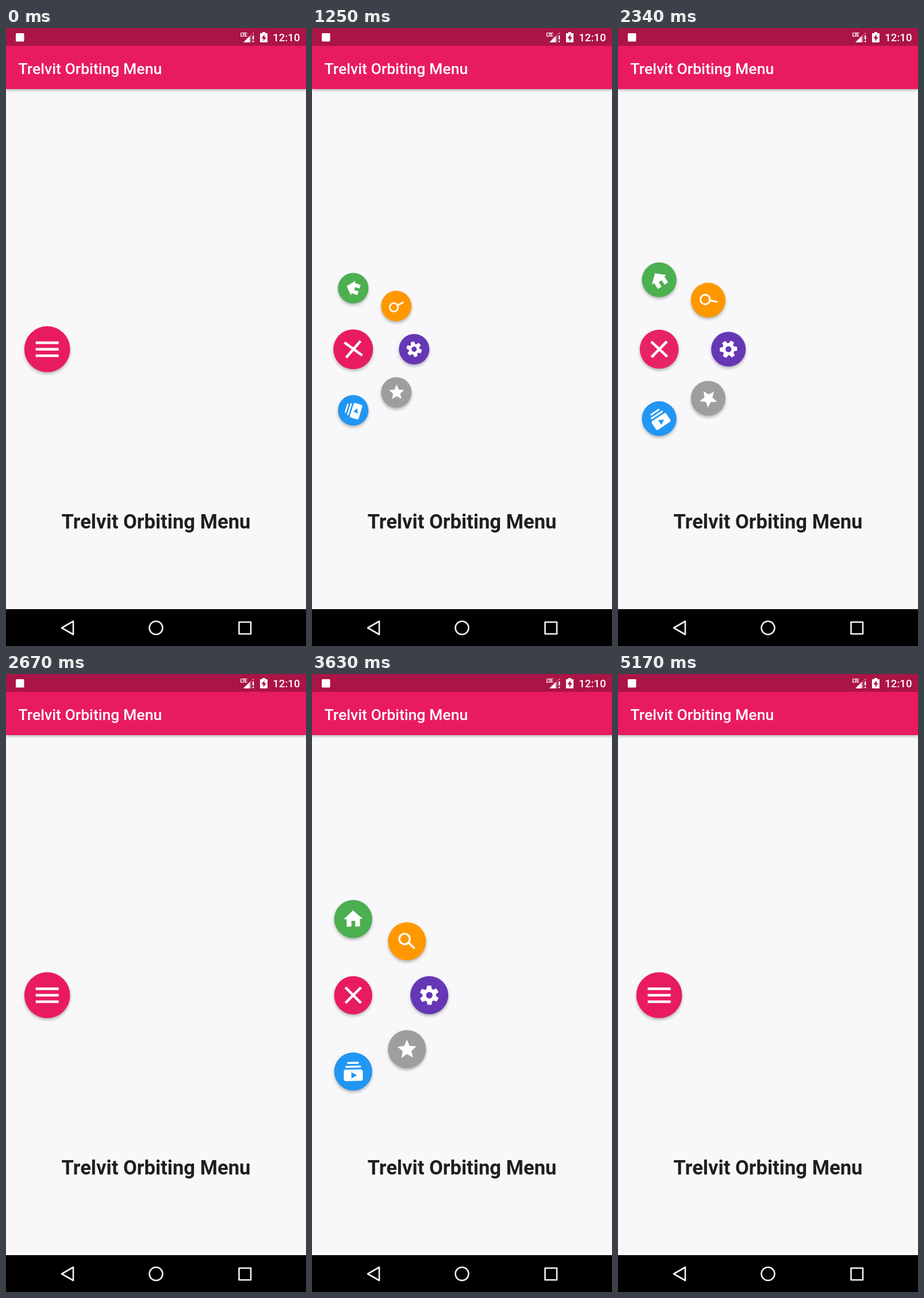
These frames come from a looping animation (522x1073 px, 5210 ms). An HTML page:

```html
<!DOCTYPE html>
<html lang="en">
<head>
<meta charset="utf-8">
<title>Circular menu</title>
<style>
  html, body { margin: 0; width: 100%; height: 100%; overflow: hidden; background: #f8f8fb; }
  svg { display: block; width: 100vw; height: 100vh; }
  text { font-family: Roboto, "Liberation Sans", sans-serif; font-weight: 500; fill: #fff; }
  .bar { filter: drop-shadow(0 2px 2px rgba(0, 0, 0, .3)); }
  .disc { filter: drop-shadow(0 3px 2.5px rgba(0, 0, 0, .28)); }
  .nav { fill: none; stroke: #f3f3ee; stroke-width: 2.6; stroke-linejoin: round; }
</style>
</head>
<body>
<svg viewBox="0 0 522 1073">
  <rect width="522" height="1073" fill="#f8f8fb"/>
  <rect class="bar" y="20" width="522" height="86" fill="#e91b60"/>
  <rect width="522" height="31" fill="#ab1446"/>

  <g fill="#fff">
    <rect x="17" y="9" width="14.5" height="14.5" rx="1.5"/>
    <text x="407.5" y="14.5" font-size="9.5" letter-spacing="-1.5" style="font-weight:700">LTE</text>
    <path d="M413 25 431.500 6.500V11H427V25z" opacity=".35"/>
    <path d="M413 25 424 14V25z"/>
    <path d="M429 13h2.400v7h-2.400zM429 22h2.400v2.500h-2.400z"/>
    <path d="M446 7h5v2h3q1 0 1 1v14q0 1-1 1h-11q-1 0-1-1v-14q0-1 1-1h3z"/>
    <path d="M449.700 11 444.500 18h3.300v5l5-7h-3.100z" fill="#ab1446"/>
    <text x="511.5" y="23" font-size="18.6" text-anchor="end">12:10</text>
  </g>

  <text x="21.5" y="79.5" font-size="26.6">Trelvit Orbiting Menu</text>
  <text x="261" y="868.5" font-size="34.6" text-anchor="middle" style="font-weight:700;fill:#1f1f20">Trelvit Orbiting Menu</text>

  <g id="items"></g>
  <g transform="translate(71.7 557.7)">
    <circle id="hub" class="disc" r="39.9" fill="#e91b60"/>
    <circle id="ink" r="39.9" fill="#c8c8c8"/>
    <g stroke="#fff" stroke-width="4.5">
      <path id="top"/>
      <path id="mid" d="M-20 0H20"/>
      <path id="low"/>
    </g>
  </g>

  <rect y="1009" width="522" height="64"/>
  <g class="nav">
    <path d="M97 1041.500 117 1030V1053z"/>
    <circle cx="261" cy="1041.500" r="11.500"/>
    <rect x="405.500" y="1031.500" width="20.500" height="20.500"/>
  </g>
</svg>
<script>
const LOOP = 5210, MOVE = 500, FRAME = 1000 / 24;
const DP = 522 / 392.73;
const ORBIT = 100 * DP;
const CENTER = { x: 71.7, y: 557.7 };
// Each tap: when the menu starts moving, and whether it opens
const TAPS = [[1022, true], [2160, false], [3133, true], [4430, false]];

const tooth = 'M-2.9-5.5-2.2-10H2.2L2.9-5.5z';
const gear = '<circle r="5.25" fill="none" stroke="#fff" stroke-width="3.6"/>' +
  [0, 60, 120, 180, 240, 300].map(a => `<path d="${tooth}" transform="rotate(${a})"/>`).join('');
const glyph = d => `<path transform="translate(-12 -12)" d="${d}"/>`;

const ITEMS = [
  ['#4caf50', glyph('M10 20v-6h4v6h5v-8h3L12 3 2 12h3v8z')],
  ['#ff9800', '<circle cx="-2.5" cy="-2.5" r="5.5" fill="none" stroke="#fff" stroke-width="2"/>' +
    '<path d="M1.200 2.700 2.700 1.200 3.500 2 8.490 7 7 8.490 2 3.500z"/>'],
  ['#6637b5', gear],
  ['#9e9e9e', glyph('M12 17.27 18.18 21l-1.64-7.03L22 9.24l-7.19-.61L12 2 9.19 8.63 2 9.24l5.46 4.73L5.82 21z')],
  ['#2196f3', glyph('M20 8H4V6h16zM18 2H6v2h12zM22 12v8c0 1.1-.9 2-2 2H4c-1.1 0-2-.9-2-2v-8' +
    'c0-1.1.9-2 2-2h16c1.1 0 2 .9 2 2zm-6 4-6-3.270v6.530z')]
];

const $ = id => document.getElementById(id);
const clamp = x => Math.min(1, Math.max(0, x));
const set = (el, attrs) => { for (const k in attrs) el.setAttribute(k, attrs[k]); };

$('items').innerHTML = ITEMS.map(([color, icon]) =>
  `<g><circle class="disc" fill="${color}"/><g fill="#fff">${icon}</g></g>`).join('');
const items = [...$('items').children];

function bounceOut(t) {
  const k = 7.5625, d = 2.75;
  if (t < 1 / d) return k * t * t;
  if (t < 2 / d) return k * (t - 1.5 / d) ** 2 + .75;
  if (t < 2.5 / d) return k * (t - 2.25 / d) ** 2 + .9375;
  return k * (t - 2.625 / d) ** 2 + .984375;
}

// cubic-bezier(.4, 0, .2, 1)
function fastOutSlowIn(x) {
  let lo = 0, hi = 1;
  for (let i = 0; i < 24; i++) {
    const s = (lo + hi) / 2, r = 1 - s;
    if (1.2 * s * r * r + .6 * s * s * r + s ** 3 < x) lo = s; else hi = s;
  }
  return lo * lo * (3 - 2 * lo);
}

function openness(t) {
  let v = 0;
  for (const [start, opens] of TAPS) {
    if (t < start) break;
    const p = clamp((t - start) / MOVE);
    v = opens ? bounceOut(p) : fastOutSlowIn(1 - p);
  }
  return v;
}

// Press highlight: rises before the menu moves, then fades
function pressure(t) {
  return Math.max(...TAPS.map(([start]) =>
    t < start ? clamp(1 - (start - t - 20) / 100) : clamp(1 - (t - start) / 200)));
}

function stroke(el, side, turn, e) {
  const half = 20 - e, y = side * 11.2 * (1 - e);
  set(el, { d: `M${-half} ${y}H${half}`, transform: `rotate(${turn * e})` });
}

function draw(t) {
  const v = openness(t), press = pressure(t);
  items.forEach((item, i) => {
    const a = (i - 2) * Math.PI / 4, d = v * ORBIT;
    set(item, {
      transform: `translate(${CENTER.x + d * Math.cos(a)} ${CENTER.y + d * Math.sin(a)})`,
      visibility: v > .01 ? 'visible' : 'hidden'
    });
    set(item.firstChild, { r: 25 * DP * v });
    set(item.lastChild, { transform: `rotate(${360 * v}) scale(${v * 30 * DP / 24})` });
  });

  const r = (30 - 5 * v) * DP;
  set($('hub'), { r });
  set($('ink'), { r, opacity: .4 * press });
  $('hub').style.filter =
    `drop-shadow(0 ${3 + 3 * press}px ${2.5 + 2.5 * press}px rgba(0,0,0,.28))`;
  stroke($('top'), -1, 135, 1 - (1 - v) ** 2.2);
  stroke($('low'), 1, 225, 1 - (1 - v) ** 2);
  set($('mid'), { opacity: clamp(1 - v / .3) });
}

const begin = performance.now();
function tick() {
  const t = Math.max(0, performance.now() - begin) % LOOP;
  draw(t < 130 ? 0 : 130 + Math.floor((t - 130) / FRAME + .2) * FRAME);
  requestAnimationFrame(tick);
}
tick();
</script>
</body>
</html>
```
